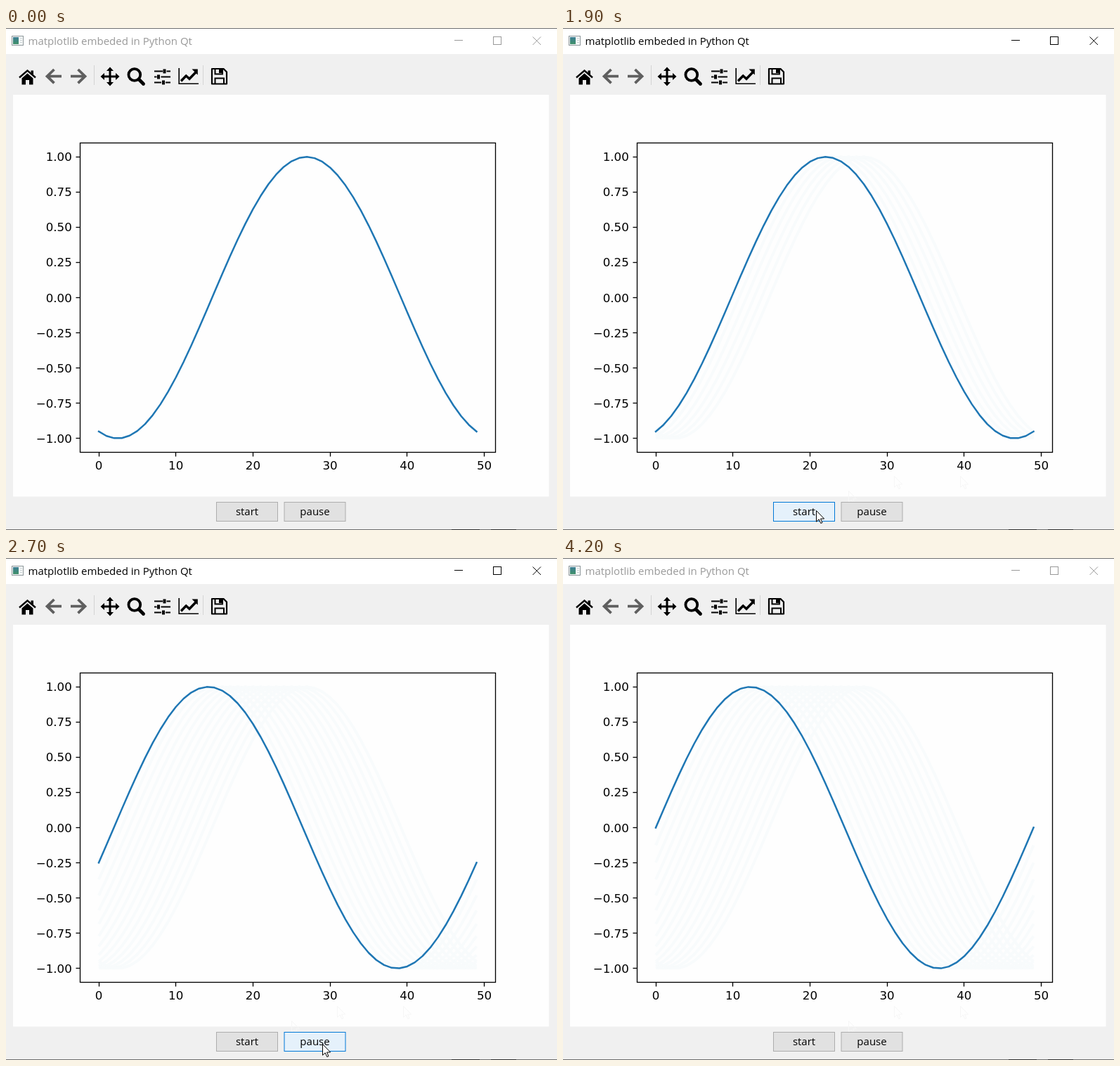
An HTML page for the animation above (4300 ms loop, 784 px wide and 714 px high).

```html
<!DOCTYPE html>
<html lang="en">
<head>
<meta charset="utf-8">
<title>Sine plot window</title>
<style>
  html, body { margin: 0; width: 100%; height: 100%; overflow: hidden; background: #f0f0f0; }
  svg { display: block; width: 784px; height: 714px; }
  .ui { font: 15px "Open Sans", "Noto Sans", sans-serif; }
  .plot { font: 16.67px "DejaVu Sans", sans-serif; }
  .line { fill: none; }
</style>
</head>
<body>
<svg id="stage" viewBox="0 0 784 714" xmlns="http://www.w3.org/2000/svg">
  <defs>
    <path id="arrow" d="M.5 .5V16.2L4.2 12.8L6.8 18.5L9 17.5L6.5 12H11.6Z"/>
    <linearGradient id="teal" x2="0" y2="1">
      <stop stop-color="#3f7f96"/><stop offset="1" stop-color="#3f8f68"/>
    </linearGradient>
  </defs>
  <rect width="784" height="714" fill="#f0f0f0"/>
  <rect width="784" height="37" fill="#fff"/>
  <rect width="784" height="1" fill="#6c6c6c"/>
  <rect y="713" width="784" height="1" fill="#6c6c6c"/>
  <path d="M634 713.5H674M690 713.5H726" stroke="#2c2c2c"/>

  <!-- title bar -->
  <rect x="8.5" y="11.5" width="16" height="13" fill="#f7f9f9" stroke="#8b9599"/>
  <rect x="10" y="13" width="8" height="10" fill="url(#teal)"/>
  <path d="M20 14.5H23M20 17.5H23M20 20.5H23" stroke="#c5cdd0"/>
  <text id="title" class="ui" x="31.5" y="24">matplotlib embeded in Python Qt</text>
  <g id="controls" class="line">
    <path d="M638 17.5H650"/>
    <rect x="693.5" y="12.5" width="11" height="11"/>
    <path d="M749.5 12.5L761 24M761 12.5L749.5 24"/>
  </g>

  <!-- toolbar -->
  <path d="M125.5 53V81M280.5 53V81" stroke="#d4d4d4"/>
  <path d="M22.5 71.5L30.5 64.5L38.5 71.5V80.5H33V74H28V80.5H22.5ZM35.5 60.5H39V67L35.5 64Z"/>
  <path class="line" d="M19 70.5L30.5 60.5L42 70.5" stroke="#000" stroke-width="2.4"/>
  <g class="line" stroke="#5f5f5f" stroke-width="3.8">
    <path d="M68.5 59L58.5 68.7L68.5 78.4M59 68.7H79"/>
    <path d="M102.5 59L112.5 68.7L102.5 78.4M112 68.7H92"/>
  </g>
  <path class="line" d="M148 59V79M138 69H158" stroke="#000" stroke-width="3"/>
  <path d="M148 55.5L153 61H143ZM148 82.5L153 77H143ZM134.5 69L140 64V74ZM161.5 69L156 64V74Z"/>
  <circle class="line" cx="182.8" cy="66.5" r="8.4" stroke="#000" stroke-width="3.8"/>
  <path d="M189 73L195.5 79.5" stroke="#000" stroke-width="4.8" stroke-linecap="round"/>
  <path d="M211 61.5H223M228.5 61.5H234M211 69.5H214.5M220.5 69.5H234M211 77.5H221M227 77.5H234" stroke="#000" stroke-width="2"/>
  <path d="M225.5 58.5V64.5M217 66.5V72.5M224 74.5V80.5" stroke="#000" stroke-width="4"/>
  <path class="line" d="M246.2 57V79.3H274" stroke="#000" stroke-width="1.6"/>
  <path class="line" d="M249 75.5L256.3 68L261 72.3L270 63" stroke="#000" stroke-width="3.4"/>
  <path d="M264.5 58.5H272.8V66.8Z"/>
  <path class="line" d="M293 58H309.5L314 62.5V79.5H293Z" stroke="#000" stroke-width="2.2" stroke-linejoin="round"/>
  <path class="line" d="M297.5 79V71.5H310V79M297.5 58V65.5H308V58" stroke="#000" stroke-width="2"/>
  <rect x="303" y="59" width="4" height="5"/>

  <!-- figure -->
  <rect x="10" y="95" width="762.5" height="571.5" fill="#fefefe"/>
  <g id="trail" class="line" stroke="#f8fbfc" stroke-width="4"></g>
  <g id="ghosts" class="line" stroke="#f6f6f6"></g>
  <path id="curve" class="line" stroke="#1f77b4" stroke-width="2.5" stroke-linejoin="round" stroke-linecap="square"/>
  <rect class="line" x="105.5" y="163.5" width="591" height="440" stroke="#000" stroke-width="1.33"/>
  <g id="ticks" class="plot"></g>

  <!-- buttons -->
  <g id="start" class="ui" text-anchor="middle">
    <rect x="299.5" y="674.5" width="87" height="27"/><text x="343" y="693">start</text>
  </g>
  <g id="pause" class="ui" text-anchor="middle">
    <rect x="396" y="674.5" width="87" height="27"/><text x="439.5" y="693">pause</text>
  </g>
  <use id="cursor" href="#arrow" fill="#fff" stroke="#000"/>
</svg>
<script>
const NS = "http://www.w3.org/2000/svg";
const LOOP = 4300, STEP = 100, FIRST = 15;
const $ = id => document.getElementById(id);

function add(parent, tag, attrs, text) {
  const el = document.createElementNS(NS, tag);
  for (const name in attrs) el.setAttribute(name, attrs[name]);
  if (text !== undefined) el.textContent = text;
  parent.appendChild(el);
  return el;
}

const px = v => 132 + 10.97 * v;
const py = v => 383.5 - 200.2 * v;

// One period over 50 samples, delayed by k fiftieths of a turn
function wave(k) {
  const points = Array.from({ length: 50 }, (_, i) => {
    const y = Math.sin(2 * Math.PI * (i / 49 - k / 50));
    return px(i).toFixed(2) + " " + py(y).toFixed(2);
  });
  return "M" + points.join("L");
}

const snap = v => Math.floor(v) + 0.5;
const tick = d => add($("ticks"), "path", { d, stroke: "#000", "stroke-width": 1.33 });

for (let v = 0; v <= 50; v += 10) {
  tick(`M${snap(px(v))} 604V609.5`);
  add($("ticks"), "text", { x: px(v), y: 628, "text-anchor": "middle" }, v);
}
for (let v = -1; v <= 1; v += 0.25) {
  tick(`M105 ${snap(py(v))}H99.5`);
  const label = (v < 0 ? "\u2212" : "") + Math.abs(v).toFixed(2);
  add($("ticks"), "text", { x: 93.8, y: py(v) + 6, "text-anchor": "end" }, label);
}

const waves = Array.from({ length: FIRST + 1 }, (_, k) => wave(k));
const trail = waves.map(d => add($("trail"), "path", { d }));

// [time, x, y]; a row without a place hides the pointer
const pointer = [
  [0], [400, 774, 586], [500, 722, 607], [600, 650, 626], [700, 565, 637],
  [800, 471, 637], [900, 406, 658], [1000, 375, 677], [1100, 364, 684],
  [1200, 360, 686], [2200, 363, 687], [2300, 381, 690], [2400, 410, 690],
  [2500, 435, 690], [2600, 447, 690], [2700, 450, 691], [3100, 450, 692],
  [3200, 474, 686], [3300, 560, 645], [3400, 660, 585], [3500, 765, 524], [3600]
];
const ghosts = pointer.filter(p => p[0] >= 700 && p[0] <= 900).map(([time, x, y]) =>
  ({ time, el: add($("ghosts"), "use", { href: "#arrow", x, y }) }));

const looks = {
  plain: ["#e1e1e1", "#adadad"],
  dim: ["#e1e5e8", "#8ba3b5"],
  half: ["#e2eaf0", "#4a8fc6"],
  hover: ["#e5f1fb", "#0078d7"],
  down: ["#cce4f7", "#005499"]
};
const startLooks = [[0, "plain"], [1100, "half"], [1200, "hover"], [1300, "down"],
  [1500, "hover"], [2400, "half"], [2500, "plain"]];
const pauseLooks = [[0, "plain"], [2400, "dim"], [2500, "hover"], [2800, "down"],
  [3100, "hover"], [3200, "half"], [3300, "plain"]];

const at = (rows, t) => rows.filter(r => r[0] <= t).pop();
const show = (el, on) => el.setAttribute("visibility", on ? "visible" : "hidden");

function paint(id, rows, t) {
  const [fill, stroke] = looks[at(rows, t)[1]];
  const box = $(id).firstElementChild;
  box.setAttribute("fill", fill);
  box.setAttribute("stroke", stroke);
}

function draw(t) {
  const moved = Math.floor((t - 1400) / STEP);
  const k = FIRST - Math.max(0, Math.min(FIRST, moved));
  $("curve").setAttribute("d", waves[k]);
  trail.forEach((el, i) => show(el, i > k));
  ghosts.forEach(g => show(g.el, t >= g.time + STEP));

  const [, x, y] = at(pointer, t);
  show($("cursor"), x !== undefined);
  if (x !== undefined) $("cursor").setAttribute("transform", `translate(${x} ${y})`);

  const active = t >= 1300 && t < 4200;
  $("title").setAttribute("fill", active ? "#000" : "#999");
  $("controls").setAttribute("stroke", active ? "#000" : "#999");
  paint("start", startLooks, t);
  paint("pause", pauseLooks, t);
}

const began = performance.now();
function frame() {
  draw((performance.now() - began) % LOOP);
  requestAnimationFrame(frame);
}
draw(0);
requestAnimationFrame(frame);
</script>
</body>
</html>
```
